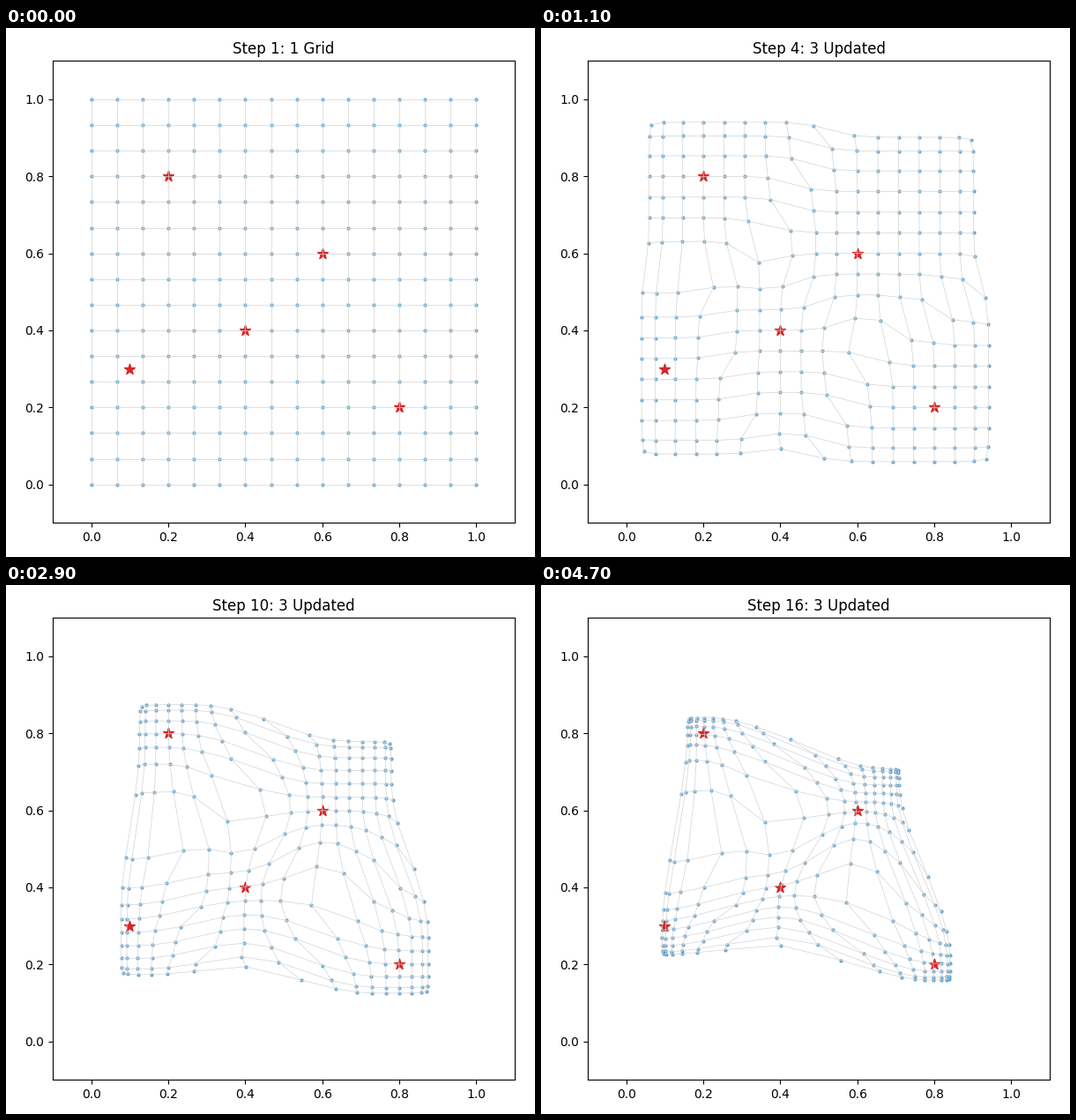
These frames come from a looping animation (600x600 px, 4800 ms). A matplotlib script:

```python
import numpy as np
import matplotlib.pyplot as plt
from matplotlib.animation import FuncAnimation

N = 16
STEPS = 16
PHASES = ["1 Grid", "2 Forces", "3 Updated"]
PULL = 0.07
SMOOTH = 0.4
TARGETS = np.array([[0.2, 0.8], [0.6, 0.6], [0.4, 0.4], [0.8, 0.2], [0.1, 0.3]])


def nearest_target(grid):
    dist = np.linalg.norm(grid[:, :, None] - TARGETS, axis=-1)
    return TARGETS[np.round(dist, 9).argmin(axis=-1)]


def neighbour_mean(grid):
    total = np.zeros_like(grid)
    count = np.zeros((N, N, 1))
    for a, b in ((slice(1, None), slice(None, -1)), (slice(None, -1), slice(1, None))):
        total[a] += grid[b]
        count[a] += 1
        total[:, a] += grid[:, b]
        count[:, a] += 1
    return total / count


def relax(grid):
    return (grid + PULL * (nearest_target(grid) - grid)
            + SMOOTH * (neighbour_mean(grid) - grid))


axis = np.linspace(0, 1, N)
states = [np.stack(np.meshgrid(axis, axis), axis=-1)]
for _ in range(STEPS - 1):
    states.append(relax(states[-1]))

fig, ax = plt.subplots(figsize=(6, 6), dpi=100)
ax.set_xlim(-0.1, 1.1)
ax.set_ylim(-0.1, 1.1)
ax.set_aspect("equal")
title = ax.set_title("Step 1: 1 Grid")

nodes = ax.scatter(*states[0].reshape(-1, 2).T, s=5, color="tab:blue", alpha=0.5)
ax.scatter(*TARGETS.T, s=80, marker="*", color="tab:red")
rows, cols = ([ax.plot([], [], color="lightgray", lw=0.5)[0] for _ in range(N)]
              for _ in range(2))
fig.tight_layout()


def draw(frame):
    step, phase = divmod(frame, len(PHASES))
    grid = states[step]
    nodes.set_offsets(grid.reshape(-1, 2))
    for i in range(N):
        rows[i].set_data(*grid[i].T)
        cols[i].set_data(*grid[:, i].T)
    title.set_text(f"Step {step + 1}: {PHASES[phase]}")
    return [nodes, title, *rows, *cols]


anim = FuncAnimation(fig, draw, frames=STEPS * len(PHASES), interval=100,
                     repeat=True, repeat_delay=0, blit=False)
plt.show()
```
